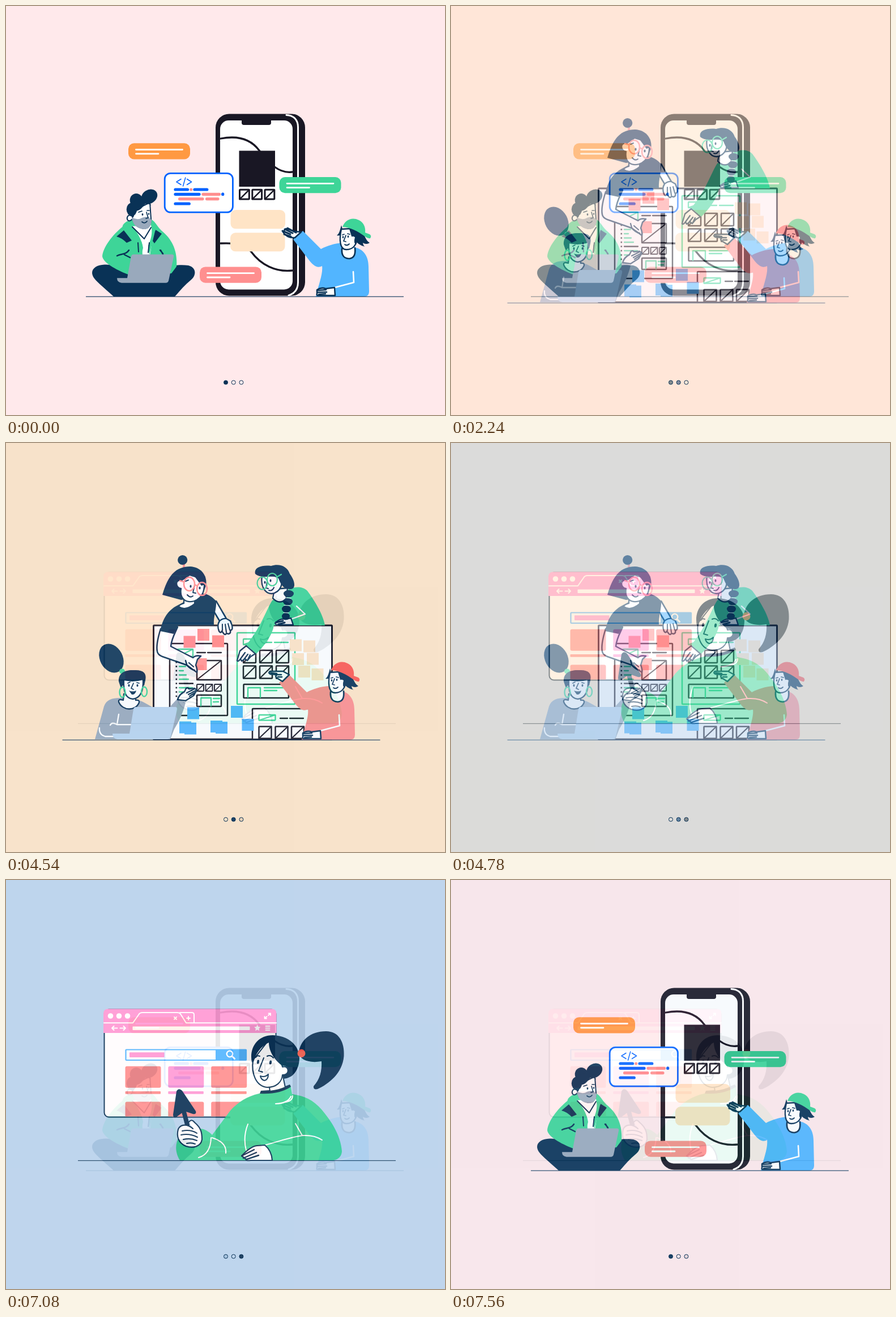
Write an HTML page that moves like this. It is 775 px wide and 722 px high and loops after 7.62 s.

```html
<!DOCTYPE html>
<html lang="en">
<head>
<meta charset="utf-8">
<title>Team slides</title>
<style>
html, body { margin: 0; width: 100%; height: 100%; overflow: hidden; }
svg { display: block; width: 100vw; height: 100vh; }
</style>
</head>
<body>
<svg id="stage" viewBox="0 0 775 722" xmlns="http://www.w3.org/2000/svg"></svg>
<script>
const navy = '#093256', ink = '#191724', green = '#3ed598', sky = '#52b5ff', salmon = '#ff8f8f',
  orange = '#ff9942', blue = '#0062ff', grey = '#99a9bc', pink = '#ff9ad5', red = '#ff5a52',
  peach = '#ffe4c6', ice = '#b8d3ee', white = '#fff';

const fill = (d, c = navy) => `<path d="${d}" fill="${c}"/>`;
const line = (d, c = navy, w = 2.5) =>
  `<path d="${d}" fill="none" stroke="${c}" stroke-width="${w}" stroke-linecap="round" stroke-linejoin="round"/>`;
const skin = (d, w = 2.5) =>
  `<path d="${d}" fill="#fff" stroke="${navy}" stroke-width="${w}" stroke-linecap="round" stroke-linejoin="round"/>`;
const box = (x, y, w, h, c, r = 0) => `<rect x="${x}" y="${y}" width="${w}" height="${h}" rx="${r}" fill="${c}"/>`;
const frame = (x, y, w, h, c = ink, s = 2.5, f = 'none', r = 1) =>
  `<rect x="${x}" y="${y}" width="${w}" height="${h}" rx="${r}" fill="${f}" stroke="${c}" stroke-width="${s}"/>`;
const oval = (x, y, rx, ry = rx, c = navy, turn = 0) =>
  `<ellipse cx="${x}" cy="${y}" rx="${rx}" ry="${ry}" fill="${c}" transform="rotate(${turn} ${x} ${y})"/>`;
const ring = (x, y, rx, ry, c, w = 2.5) =>
  `<ellipse cx="${x}" cy="${y}" rx="${rx}" ry="${ry}" fill="none" stroke="${c}" stroke-width="${w}"/>`;
const move = (x, y, s) => `<g transform="translate(${x} ${y})">${s}</g>`;
const slashBox = (x, y, w, h, c = ink, s = 2.5) =>
  frame(x, y, w, h, c, s) + line(`M${x} ${y + h}l${w} ${-h}`, c, s * .85);
const notes = (spots, c) => spots.map(([x, y]) => box(x, y, 21, 21, c)).join('');
const ground = (x, y) => box(x, y, 561, 1.1, navy);

function pager(active) {
  return [388, 401.7, 415.4].map((x, i) =>
    `<circle cx="${x}" cy="664.5" r="3.5" fill="${i === active ? navy : 'none'}" stroke="${navy}"/>`).join('');
}

function bubble(x, y, c) {
  return box(x, y, 109, 28.3, c, 10) +
    line(`M${x + 13.5} ${y + 11.3}h82M${x + 13.5} ${y + 18.6}h39.5`, white, 2.8);
}

function phone() {
  return box(370, 190.5, 158, 321, ink, 24) + box(378, 202, 128, 298.5, white, 15) +
    line('M495 192.5C508 193 515.5 201 515.5 214V488C515.5 501 508 508 499 511', white, 3) +
    fill('M416 200H468V206Q468 210 464 210H420Q416 210 416 206Z', ink) +
    line('M379 234C405 229 430 232 447 255S482 296 505 293M379 419C408 418 422 420 433 434C450 457 476 470 505 467', ink, 3.3) +
    box(411.5, 255.5, 63.5, 63.5, ink) +
    [412.5, 434.8, 457].map(x => slashBox(x, 324.3, 16.8, 16.8, ink, 3)).join('') +
    box(396.5, 360, 96.5, 33.3, peach, 9) + box(396, 400.3, 96.5, 33, peach, 9);
}

function codeCard() {
  return frame(280.2, 295.3, 120.2, 68.8, blue, 2.8, white, 10) +
    line('M309 305.5l-8 5 8 5M316.8 303l-4.3 15M319.5 305.5l8 5-8 5', blue, 1.5) +
    line('M299 324H320.5M333 324H354.8M299 332.3H341M382.7 332.1V332.4M299 349H323.3', blue, 5.2) +
    line('M326.7 324V324.1M348 332.3H376.5M306.5 340.6H347M354.5 340.6H374', salmon, 5.2) +
    line('M382.7 331.5V333', blue, 4.2);
}

function sittingMan() {
  return fill('M190 513C181 504 162 489 156 481C146 468 156 457 174 456.5C190 456 204 462 218 466H270C288 458 306 456 322 458C337 462 336 476 326 484C315 493 306 504 298 513Z') +
    fill('M208 388C187 404 171 427 170 442C172 455 200 468 218 475L292 472L301 460C303 434 295 413 274 396C266 388 264 381 257 377L220 377Z', green) +
    fill('M195 407L208 396L222 414L213 418Q204 409 195 407ZM264 395L275 402L262 419L257 412Z') +
    fill('M221 389L240 418L241 441H254L258 416L260 386Z', white) +
    fill('M222 377C209 380 204 388 206 392C218 394 230 415 239 440L242 427C240 412 230 396 222 389ZM257 378C265 384 266 391 263 398L253 440L251 423C257 410 259 398 256 387Z', green) +
    line('M223 390L244 411L256 391M233 418L234 434M253 418L251 435', navy, 2) +
    line('M196 441C204 437 212 439 217 431M209 439L219 444M273 431L280 444M272 431L277 437') +
    skin('M222 377C216 383 212 376 215 371Q219 367 224 372', 2) +
    skin('M223 362L254 347L256 376C256 388 251 393 243 393Q224 389 223 372Z', 2) +
    fill('M222 373Q232 379 240 374Q251 369 257 378C257 388 252 394 243 394Q224 392 222 373Z', grey) +
    oval(253, 336.5, 15, 12, navy, -32) + oval(230, 343, 11.3, 12) + oval(222, 359, 9.3, 11.5) +
    fill('M216 366C215 346 237 334 253 345L256 352Q248 346 244 351Q238 361 229 362L225 373L218 370Z') +
    line('M234 364L240 362M249 361L253 361M248 364L251 374L247 375M240 381Q245 385 249 380', navy, 1.7) +
    oval(241, 368, 1.4, 2) + oval(252, 367, 1.2, 1.8) +
    fill('M225 438.5H293Q297 438.5 296 443L287 485Q286 488.7 282 488.7H204Q196 488 196 480.3H214L221 442Q222 438.5 225 438.5Z', grey);
}

// Torso, head and cap shared by two people; the head sits a little differently on each.
function capPerson(shirt, cap, headShift = 0) {
  const body = fill('M524 397L556 429C567 423 580 419 595 418L619 427C633 431 640 444 640 460L641 504Q641 513 632 513H547C551 494 560 473 558 459C549 464 542 457 536 450L507 412Z', shirt) +
    line('M613 469L614 488L580 497', white, 2.6) +
    skin('M549 501Q557 496 564 499L580 497L581 511H551Q548 511 549 508Z') +
    line('M551 502L565 501M550 505.5L566 505M552 509L564 508', navy, 2.6);
  const head = skin('M594 424C591 436 594 446 606 446C616 445 617 436 616 427', 2.7) +
    fill('M592 387C589 398 588 402 584 405Q590 406 597 403ZM608 390L628 390C632 404 635 414 642 418Q636 422 630 418Q631 424 634 425Q621 422 614 411Z') +
    skin('M592 394C588 412 589 430 601 430C613 430 620 421 619 408C619 402 612 400 611 406L607 393Z', 2.3) +
    fill('M606 390L611 406L616 408Q613 419 618 421Q622 414 621 405L619 391Z') +
    line('M594 404L597 403M603 402L607 403M600 405L596 415L600 416M598 421Q602 424 606 420', navy, 1.8) +
    oval(595, 408, 1.3, 2) + oval(604, 407, 1.3, 2) +
    fill('M594 390C599 377 611 372 623 378C633 383 635 393 634 400L642 403Q646 406 643 410Q639 411 634 407C620 397 609 391 594 390Z', cap);
  return body + move(headShift, 0, head);
}

function openHand() {
  return skin('M489 399L494 393L510 398L521 399L510 409Q496 410 489 399Z') +
    line('M488 397L502 403M492 394L506 401M497 392L512 400M491 403L503 407', navy, 3);
}

function wireframes() {
  let s = frame(260.5, 322, 315, 201, ink, 3, white, 1) + frame(289, 354, 102, 127) +
    slashBox(303, 364, 27, 13, green, 2.3) + line('M337 370H352M356 370H380', ink, 2.3);
  for (let i = 0; i < 9; i++) {
    const y = 387 + i * 7.5, heading = i === 0 || i === 5;
    s += box(299.5, y - 1.3, 2.6, 2.6, ink) +
      line(`M306 ${y}h${heading ? 24 : [0, 11, 7, 12, 16, 0, 23, 16, 23][i]}`, heading ? ink : green, 2.3);
  }
  s += slashBox(337, 384, 43, 34) + [337, 352.5, 368].map(x => slashBox(x, 426, 12, 12, ink, 2)).join('') +
    frame(337, 445, 43, 20) + line('M344 464V450H362V464M366 451H377M366 457H375', green, 2.3) +
    frame(408, 335, 102, 126, green) + slashBox(419, 346, 28, 10, green, 2.3) +
    line('M451 352H469M474 352H498', green, 2.3);
  for (const y of [366, 393.5]) for (const x of [419, 448, 477]) s += slashBox(x, y, 22, 22);
  return s + frame(419.5, 426, 79.5, 24) + line('M427 449V432H449V449M456 432H490M456 437H478', green, 2.3) +
    frame(435, 469, 102, 54, ink, 2.5, white) + slashBox(446.5, 480, 29, 9.5, green, 2.3) +
    line('M484 486H497M501 486H525', ink, 2.3) + [446.5, 475.5, 504].map(x => slashBox(x, 500.5, 22, 21)).join('') +
    notes([[338, 328], [313.5, 340.5], [364, 339.5], [333.5, 380]], salmon) +
    notes([[320, 466.5], [306, 491.5], [315, 493.5], [361, 490], [370, 492], [397, 464], [416.5, 487]], sky) +
    notes([[501, 346.5], [525, 348.5], [505, 371], [531, 370.5], [516, 393], [539.5, 398]], peach);
}

function bunWoman() {
  return line('M314 214V221', salmon, 4) + oval(311.7, 206.5, 8.6) +
    fill('M276 268C284 241 295 218 325 218C346 219 356 236 353 252L345 272L309 277Z') +
    skin('M273 328C268 344 265 358 267 368Q268 374 276 377L319 392L337 405Q338 399 335 392L338 382L344 376Q335 374 330 379L291 359C292 346 298 336 303 325') +
    line('M319 392Q326 400 333 401M323 388L331 395M319 391L317 384', navy, 2.3) +
    skin('M362 289L377 314Q372 322 376 332Q379 337 381 332L384 336Q387 340 389 336L393 337Q397 336 396 331Q401 330 399 322L396 314L389 310L371 279Z') +
    line('M382 320V331M387 320L389 334M392 319L395 330M377 314Q383 309 389 310', navy, 2.2) +
    fill('M304 286C283 296 276 314 272 332L296 337L304 322H367C366 306 372 292 371 279C361 268 350 264 341 267Q330 272 304 286Z') +
    skin('M314 272L314 283Q305 286 305 289Q317 297 333 284V274', 2.3) +
    skin('M309 243C298 240 299 256 309 257C306 276 319 283 332 279C349 273 351 258 350 241L324 233Z', 2.3) +
    fill('M308 244Q317 232 331 233L345 252L351 250L352 236L325 222L308 230Z') +
    line('M333 251L330 264L335 265M320 268Q325 274 330 270M317 244L322 242', navy, 2) +
    oval(326, 253, 1.6, 2.4) + oval(342, 256, 1.6, 2.4) +
    ring(323.5, 249, 9.5, 12, salmon) + ring(346, 257.5, 9, 11.5, salmon) +
    line('M307 243L314 245M333 250L337 252', salmon);
}

function braidWoman() {
  return fill('M470 278C459 295 451 324 424 357L442 372C456 358 470 340 473 322H563C560 302 543 276 532 261C523 252 510 254 501 257Z', green) +
    line('M513 288L528 302L503 311', white, 2.3) +
    skin('M475 318Q484 309 493 311L503 309L507 321H477Z', 2.3) + line('M476 317L489 314M481 320L492 317', navy, 3) +
    skin('M424 358L413 367L408 384Q410 387 414 381L416 385L422 381L426 384L432 377L440 372Z', 2.3) +
    line('M414 381L422 370M420 382L427 373M427 382L431 374', navy, 2.3) +
    skin('M474 258L471 274Q482 286 494 276L497 256Z', 2.3) +
    skin('M452 235C449 252 457 266 469 266C482 264 489 254 487 234Z', 2.3) +
    fill('M440 231C437 220 451 215 468 217C483 212 497 218 501 231C511 244 512 258 502 258C489 258 485 249 481 239Q470 233 461 236Q446 237 440 231Z') +
    [[499, 266, 9], [497.5, 280, 8.5], [495, 293, 8], [494, 306, 7]].map(([x, y, r]) => oval(x, y, r, 6.3)).join('') +
    line('M493 273L503 274M491 286.5L501 287M490 299.5L499 300', white, 1.2) +
    line('M461 244L459 256L463 257M464 260Q470 262 473 255', navy, 2) +
    oval(457, 246, 1.5, 2.4) + oval(467, 243, 1.5, 2.4) +
    ring(452.5, 247.5, 9, 11, green, 2.2) + ring(470, 241, 9, 11, green, 2.2) + line('M479 236L486 232', green, 2.2);
}

function laptopWoman() {
  return fill('M157 523L173 465C177 453 188 450 201 450C225 446 245 458 259 467L289 466L302 452L317 458C313 476 305 492 297 505L290 523Z', grey) +
    line('M199 479L196 497L222 497M196 497Q187 492 184 498M165 503Q164 515 175 518H190', white, 2.3) +
    skin('M303 453Q306 443 315 439L318 433Q321 431 323 434L333 433L337 436L331 446L317 455Z') +
    line('M319 441L333 434M322 444L335 437M324 447L333 441', navy, 2.3) +
    oval(186, 380, 20, 27, navy, -28) + oval(205, 403, 5, 4.5, green) +
    skin('M208 443L207 454Q198 451 199 457C205 473 229 474 235 458Q236 453 229 454L228 444Z', 2.3) +
    fill('M199 421C198 406 210 400 226 401C242 400 249 406 246 419L244 428H206L203 433Z') +
    skin('M208 418C207 439 211 451 224 452C238 450 243 438 242 417Q225 422 208 418Z', 2.3) +
    fill('M201 414Q212 402 230 402Q244 401 246 416Q225 420 206 417L204 431Z') +
    line('M225 424L221 433L225 435M215 424L219 422M231 423L235 424', navy, 1.8) +
    oval(217, 428, 1.5, 2.3) + oval(232, 428, 1.5, 2.3) + fill('M217 437Q224 440 230 437Q228 445 222 444Z') +
    ring(205.5, 440, 5, 9, green, 2.4) + ring(244, 439, 5, 8.5, green, 2.4) +
    fill('M229 466H299Q303 466 302 471L291 518Q290 523 284 523H197Q188 522 188 513H218L225 470Q226 466 229 466Z', ice);
}

function pointingHand() {
  return skin('M500 409L489 403L466 403Q462 406 467 408L478 409Q474 413 480 416L488 421Z') +
    line('M467 405.5L478 407M478 409L486 409M480 413L487 413', navy, 2.6);
}

function browser() {
  let s = frame(173.5, 228.5, 303, 190, navy, 2, white, 8) +
    fill('M172 270V236Q172 227.5 180.5 227.5H469Q477.5 227.5 477.5 236V270Z', pink) +
    [184.5, 199.5, 214.5].map(x => oval(x, 240, 4.8, 4.8, white)).join('') +
    line('M173 252.3H224L234 238Q236 234 241 234H302Q307 234 309 238L318 252.3H477M307 234H328Q332 234 332 238V252', white, 2) +
    line('M297 242l4 4m0-4l-4 4M319 244h6m-3-3v6', white, 2) +
    line('M456.5 241v3.5h3.5m-3.5 0l4-3.5M467 239v-3.5h-3.5m3.5 0l-4 3.5', white, 1.8) +
    line('M196.5 261.5H187m3.5-3.5l-3.5 3.5 3.5 3.5M201.5 261.5H211m-3.5-3.5l3.5 3.5-3.5 3.5M458.5 258h7m-7 3.5h7m-7 3.5h7', white, 2) +
    box(223.5, 258.5, 207, 6.5, white, 1) +
    fill('M443.7 255.5l1.7 3.5 3.9.6-2.8 2.7.7 3.9-3.5-1.9-3.5 1.9.7-3.9-2.8-2.7 3.9-.6Z', white) +
    frame(211.5, 299.5, 212.5, 18.5, sky, 2.2, white) + box(370, 299, 54.5, 19.5, sky) + box(218, 304.3, 61.5, 8.7, pink, 1) +
    ring(395, 307, 5.3, 5.3, white, 2.3) + line('M399 311L403.5 315.5', white, 3);
  [210.5, 286.3, 362.2].forEach((x, i) => {
    const c = i === 1 ? pink : salmon;
    s += box(x, 328.8, 63, 38, c, 3) + box(x, 373, 62.5, 4.7, c, 1) +
      fill(`M${x} 417.5V394.5q0-3 3-3h57q3 0 3 3V417.5Z`, salmon);
  });
  return s;
}

function cursorWoman() {
  return fill('M517 306C518 284 537 267 565 267C588 267 598 287 596.5 311C594 341 570 360 550 369Q542 371 543 364C554 352 558 337 557 320C535 324 519 317 517 306Z') +
    fill('M447 377C425 382 410 392 396 407L364 450Q354 440 344 439L307 451C297 466 299 482 307 495H578Q592 492 593 479C591 450 573 424 557 405C542 387 523 380 505 378L502 362Z', green) +
    fill('M448 377L450 372Q477 372 501 361L503 365Q482 379 448 377Z') +
    skin('M463 353L466 373Q483 371 493 366L488 342Z', 2) +
    skin('M436 318C433 342 441 364 461 366C477 366 487 357 488 344C502 345 500 326 488 330L477 290L462 285Z', 2) +
    fill('M434 322C429 297 443 274 471 274C499 275 518 292 518 315C517 338 505 350 490 351L488 344C502 345 501 326 488 328C475 319 464 303 464 287C450 293 440 307 437 322Z') +
    oval(521.5, 306, 7, 7.2, red) +
    line('M441 313Q443 309 448 311M461 311Q467 308 472 314M455 314L446 337L453 339', navy, 2) +
    oval(445, 321, 2.1, 3.6, navy, 10) + oval(467, 322, 2.1, 3.6, navy, 10) +
    skin('M449 346Q457 349 463 343Q463 353 456 354Q450 352 449 346Z', 2) +
    line('M476 395Q498 394 503 382M489 393Q506 391 506 381M427 431Q418 454 424 477M457 468C490 459 510 452 525 451Q545 450 558 459M511 430L523 451M364 455Q390 463 388 482M362 455Q361 484 340 490', white, 2) +
    line('M313 405L320 432', navy, 8) +
    fill('M301 373Q305 366 311 372L335 408Q337 414 330 413L315 408L300 419Q295 421 295 414Z') +
    skin('M323 427Q328 421 333 428C345 438 346 447 346 458C344 471 330 474 318 470C303 464 301 451 304 440Q308 431 319 433Q326 435 330 439', 2.2) +
    line('M311 443Q326 440 337 447M309 450Q324 447 338 454M313 458Q326 455 337 460M319 465Q328 463 334 466', navy, 2) +
    skin('M416 487Q432 470 443 469L457 468Q469 478 470 495H432Q422 496 424 493Z', 2.2) +
    line('M416 487L438 476M419 491L442 481M425 493L446 486', navy, 2.4);
}

const scenes = [
  box(0, 0, 775, 722, '#ffe9eb') + phone() + sittingMan() + bubble(216, 242.2, orange) + bubble(482.5, 302, green) +
    bubble(342, 460.4, salmon) + codeCard() + capPerson(sky, green) + openHand() + ground(141, 512.5),
  box(0, 0, 775, 722, peach) + wireframes() + bunWoman() + braidWoman() + laptopWoman() +
    move(-25, 11, capPerson(salmon, red, 5)) + pointingHand() + ground(99.5, 523.7),
  box(0, 0, 775, 722, ice) + browser() + cursorWoman() + ground(127, 494.8)
];

const stage = document.getElementById('stage');
stage.innerHTML = scenes.map((s, i) => `<g>${s}${pager(i)}</g>`).join('');
const layers = [...stage.children];

const HOLD = 2000, STEP = 60, SLOT = 2540;

function render(time) {
  const t = time % (SLOT * 3), current = Math.floor(t / SLOT), local = t % SLOT;
  const mix = local < HOLD ? 0 : (Math.floor((local - HOLD) / STEP) + 1) / 10;
  const next = (current + 1) % 3;
  // The later layer lies on top, so only its opacity carries the blend.
  layers.forEach((layer, i) => {
    const opacity = i === Math.min(current, next) ? 1 : i === next ? mix : i === current ? 1 - mix : 0;
    layer.setAttribute('opacity', opacity);
    layer.style.display = opacity ? '' : 'none';
  });
}

const start = performance.now();
function tick() {
  render(performance.now() - start);
  requestAnimationFrame(tick);
}
tick();
</script>
</body>
</html>
```
